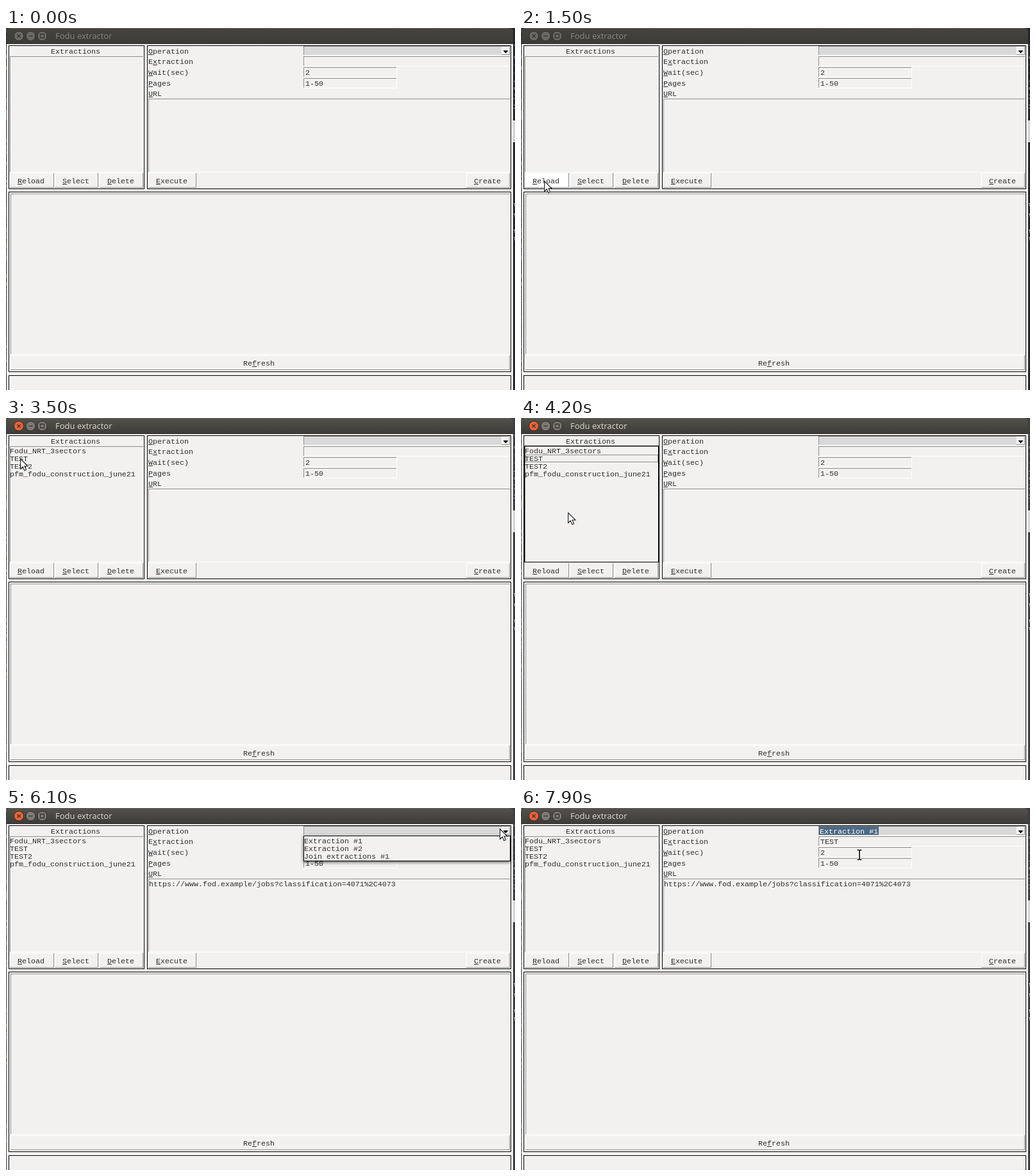
Recreate the animation shown at these times as an HTML page. Size 794 px wide and 564 px high, loop 8 s.

```html
<!DOCTYPE html>
<html lang="en">
<head>
<meta charset="utf-8">
<title>Fodu extractor</title>
<style>
  html, body { margin: 0; width: 100%; height: 100%; overflow: hidden; background: #f2f1f0; }
  svg { display: block; }
  text { font: 11.667px "Liberation Mono", "DejaVu Sans Mono", monospace; fill: #2e2e2e; white-space: pre; }
  #title { font: 500 13px "Open Sans", "Noto Sans", sans-serif; }
</style>
</head>
<body>
<svg id="stage" width="794" height="564" viewBox="0 0 794 564"></svg>
<script>
const BG = '#f2f1f0', DARK = '#8f8e8c', LIGHT = '#ffffff';
const LOOP = 8000, STEP = 100;

const rect = (x, y, w, h, fill, more = '') =>
  `<rect x="${x}" y="${y}" width="${w}" height="${h}" fill="${fill}" ${more}/>`;
const outline = (x, y, w, h, color, more = '') =>
  `<rect x="${x + .5}" y="${y + .5}" width="${w - 1}" height="${h - 1}" fill="none" stroke="${color}" ${more}/>`;
const group = (id, body) => `<g id="${id}">${body}</g>`;

// Fixed-pitch label; key is the index of the underlined letter.
function label(str, x, y, key = -1, fill = '') {
  const line = key < 0 ? '' : rect(x + key * 7, y + 1, 7, 1, '#2e2e2e');
  return `<text x="${x}" y="${y}"${fill && ` style="fill:${fill}"`}>${str}</text>` + line;
}

const bevel = (x, y, w, h, top, bottom, fill = BG, ids = ['', '', '']) =>
  rect(x, y, w, h, bottom, ids[0]) +
  rect(x, y, w - 1, h - 1, top, ids[1]) +
  rect(x + 1, y + 1, w - 2, h - 2, fill, ids[2]);
const sunken = (x, y, w, h, fill) => bevel(x, y, w, h, DARK, LIGHT, fill);
const panel = (x, y, w, h) => outline(x, y, w, h, '#000') + outline(x + 1, y + 1, w - 2, h - 2, '#fafaf9');

// name, x, y, width, height, text x, underlined letter
const buttons = [
  ['Reload', 6, 226, 69, 23, 18, 0],
  ['Select', 76, 226, 68, 23, 88, 0],
  ['Delete', 146, 226, 68, 23, 158, 0],
  ['Execute', 222, 226, 75, 23, 234, 0],
  ['Create', 718, 226, 68, 23, 730, 0],
  ['Refresh', 7, 510, 779, 23, 370, 2]
];
const button = ([name, x, y, w, h, tx, key]) =>
  bevel(x, y, w, h, LIGHT, DARK, BG, ['Low', 'High', 'Face'].map(s => `id="${name + s}"`)) +
  label(name, tx, Math.round(y + h / 2 + 4), key);

function desktop() {
  let seed = 7, out = rect(0, 0, 794, 564, '#25242a');
  const rnd = () => (seed = seed * 16807 % 2147483647) / 2147483647;
  const tones = ['#4d6a3c', '#47548c', '#3c3c46', '#5c6270'];
  for (let i = 0; i < 90; i++) {
    const y = Math.floor(rnd() * 560), h = 1 + Math.floor(rnd() * 4);
    out += rect(0, y, 1, h, tones[Math.floor(rnd() * 4)]);
  }
  for (let i = 0; i < 14; i++)
    out += rect(792, Math.floor(rnd() * 130), 2, 2, tones[1 + Math.floor(rnd() * 3)]);
  for (const y of [273, 289, 314, 326]) out += rect(792, y, 2, 1, '#b5b5b5') + rect(793, y + 1, 1, 4, '#8a8a8a');
  return out + rect(791, 144, 3, 34, '#d4d3d1');
}

function titleBar() {
  const glyphs = ['M17.5 10l5 5m0-5l-5 5', 'M35.5 12.5h6', 'M53.5 9.5h6v6h-6z'];
  return '<path id="bar" d="M1 25V5Q1 0 6 0H786Q791 0 791 5V25Z"/>' +
    rect(6, 0, 780, 1, '#66635c') + rect(1, 24, 790, 1, '#35342f') +
    [20, 38.5, 56.5].map((x, i) =>
      `<circle class="knob" cx="${x}" cy="12.5" r="7.5" stroke="#2f2e2a"/>` +
      `<path d="${glyphs[i]}" fill="none" stroke="#35342f" stroke-width="1.3"/>`).join('') +
    '<text id="title" x="77" y="17">Fodu extractor</text>';
}

const names = ['Fodu_NRT_3sectors', 'TEST', 'TEST2', 'pfm_fodu_construction_june21'];
const choices = ['Extraction #1', 'Extraction #2', 'Join extractions #1'];
const rows = (list, x) => list.map((s, i) => label(s, x, 55 + 12 * i)).join('');

const defs = `<defs>
  <linearGradient id="lit" x2="0" y2="1"><stop stop-color="#54524b"/><stop offset="1" stop-color="#3c3b37"/></linearGradient>
  <linearGradient id="dim" x2="0" y2="1"><stop stop-color="#45433e"/><stop offset="1" stop-color="#3c3b37"/></linearGradient>
  <filter id="shade" x="-5%" y="-50%" width="110%" height="200%">
    <feDropShadow dx="0" dy="1.5" stdDeviation="2.6" flood-color="#000" flood-opacity=".65"/></filter></defs>`;

const arrow = '<path d="M.6 .8V16.4L4.3 13L6.8 18.9L9.5 17.8L7 12H12Z" fill="#fff" stroke="#1a1a1a" stroke-width="1.1"/>';
const beamPath = 'M-3.5 -7.5H-1.2L0 -6.5L1.2 -7.5H3.5M0 -6.5V6.5M-3.5 7.5H-1.2L0 6.5L1.2 7.5H3.5';
const beam = [['#fff', 3.4], ['#000', 1.6]].map(([c, w]) =>
  `<path d="${beamPath}" fill="none" stroke="${c}" stroke-width="${w}"/>`).join('');

document.getElementById('stage').innerHTML = defs +
  group('desk', desktop()) + rect(1, 20, 790, 544, BG) + titleBar() +
  panel(4, 27, 212, 224) + panel(220, 27, 568, 224) + panel(4, 255, 784, 281) + panel(4, 541, 784, 60) +
  label('Extractions', 70, 40) + sunken(6, 44, 209, 181) +
  label('Operation', 222, 40, 0) + label('Extraction', 222, 56, 1) + label('Wait(sec)', 222, 73, 0) +
  label('Pages', 222, 90, 0) + label('URL', 222, 106, 0) +
  sunken(464, 28, 323, 15, '#d9d9d9') +
  bevel(773, 29, 13, 13, LIGHT, DARK) + '<path d="M775.5 35H783.5L779.5 39.5Z" fill="#000"/>' +
  sunken(464, 44, 323, 16) + sunken(464, 61, 146, 16) + sunken(464, 78, 146, 16) +
  label('2', 467, 73) + label('1-50', 467, 90) +
  sunken(222, 110, 565, 115) + sunken(7, 258, 780, 251) +
  buttons.map(button).join('') +
  group('names', rows(names, 6)) +
  group('focus', outline(5, 43, 210, 182, '#000') + outline(7, 57, 207, 12, '#222', 'stroke-dasharray="1 1"')) +
  group('filled', label('TEST', 467, 56) +
    label('https://www.fod.example/jobs?classification=4071%2C4073', 223, 122)) +
  group('chosen', rect(465, 29, 93, 13, '#4a6984') + label(choices[0], 466, 40, -1, '#fff')) +
  group('popup', rect(464, 43, 323, 40, '#000', 'filter="url(#shade)"') +
    rect(465, 44, 321, 38, BG) + rows(choices, 465)) +
  group('arrow', arrow) + group('beam', beam);

const el = id => document.getElementById(id);
const show = (id, on) => el(id).setAttribute('visibility', on ? 'visible' : 'hidden');
const paint = (node, fill) => node.setAttribute('fill', fill);

const linear = p => p, out = p => p * (2 - p), smooth = p => p * p * (3 - 2 * p);
// time, pointer x, y, easing toward this point
const path = [
  [300, 128, 0], [1100, 62, 213, linear], [1500, 36, 238, out], [2500, 36, 238],
  [3300, 21, 56, smooth], [3400, 21, 56], [3500, 22, 63], [3900, 22, 63],
  [4500, 123, 230, smooth], [5000, 123, 230], [5900, 770, 32, smooth], [6100, 770, 32],
  [6800, 546, 44, smooth], [6900, 547, 47], [7300, 547, 47], [7400, 547, 48],
  [7700, 547, 48], [7900, 528, 73]
];

function pointer(t) {
  const i = path.findIndex(p => p[0] > t);
  if (i === 0) return null;
  if (i < 0) return path[path.length - 1].slice(1, 3);
  const [t0, x0, y0] = path[i - 1], [t1, x1, y1, ease = linear] = path[i];
  const p = ease((t - t0) / (t1 - t0));
  return [Math.round(x0 + (x1 - x0) * p), Math.round(y0 + (y1 - y0) * p)];
}

const inside = (px, py, x, y, w, h) => px >= x && px < x + w && py >= y && py < y + h;
const fields = [[464, 28, 304, 15], [464, 44, 323, 16], [464, 61, 146, 16], [464, 78, 146, 16], [222, 110, 565, 115]];

function draw(t) {
  const active = t >= 2000, popup = t >= 6000 && t < 7500;
  const pos = pointer(t), [x, y] = pos || [-99, -99];

  paint(el('bar'), active ? 'url(#lit)' : 'url(#dim)');
  el('title').style.fill = active ? '#dfdbd2' : '#8b8780';
  document.querySelectorAll('.knob').forEach((k, i) =>
    paint(k, !active ? '#6b6963' : i ? '#7d7a73' : '#ee6237'));
  el('desk').setAttribute('opacity', active ? .88 : 1);

  show('names', t >= 2200);
  show('focus', t >= 3700 && t < 6000);
  show('filled', t >= 4900);
  show('popup', popup);
  show('chosen', t >= 7500);

  const pressed = t >= 2000 && t < 2200 ? 'Reload' : t >= 4800 && t < 4900 ? 'Select' : '';
  for (const [name, ...box] of buttons) {
    const down = name === pressed;
    paint(el(name + 'Face'), inside(x, y, ...box.slice(0, 4)) ? '#fff' : BG);
    paint(el(name + 'High'), down ? DARK : LIGHT);
    paint(el(name + 'Low'), down ? LIGHT : DARK);
  }

  const typing = t >= 7400 || (!popup && fields.some(f => inside(x, y, ...f)));
  show('arrow', pos && !typing);
  show('beam', pos && typing);
  for (const id of ['arrow', 'beam']) el(id).setAttribute('transform', `translate(${x} ${y})`);
}

let last = -1;
function tick(now) {
  const t = Math.floor((now % LOOP) / STEP + 1e-6) * STEP % LOOP;
  if (t !== last) draw(last = t);
  requestAnimationFrame(tick);
}
draw(0);
requestAnimationFrame(tick);
</script>
</body>
</html>
```
